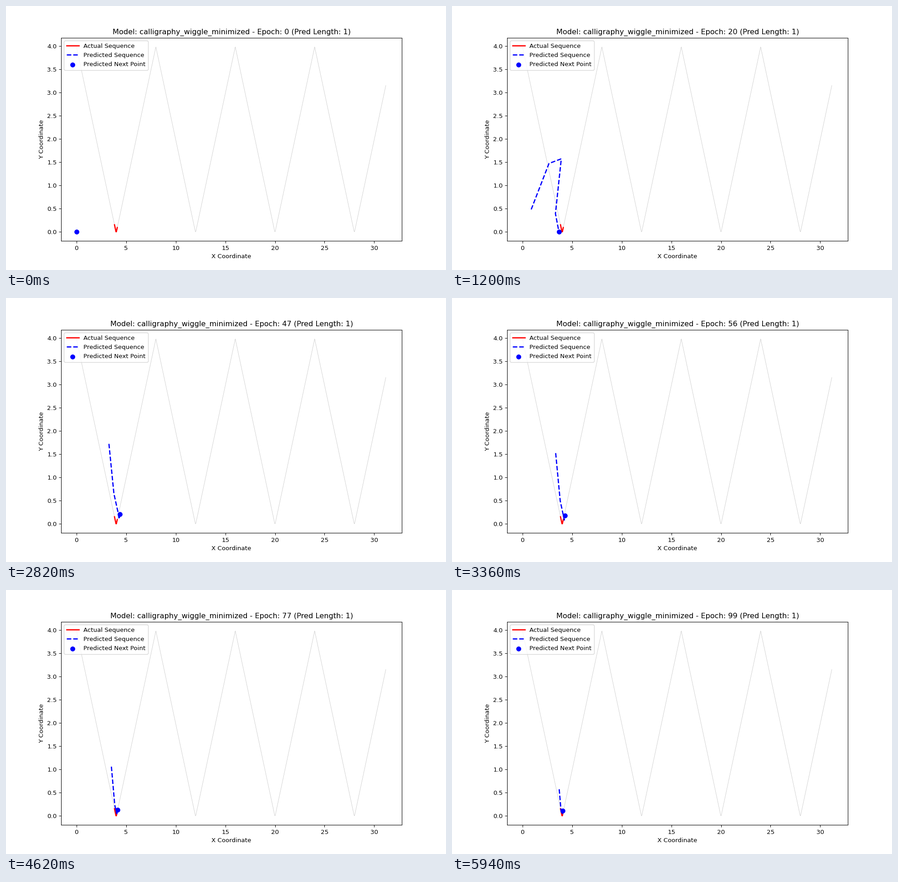
Recreate the animation shown at these times as a matplotlib script. Size 966 by 580 pixels, loop 6000 ms.

```python
import numpy as np
import matplotlib.pyplot as plt
from matplotlib.animation import FuncAnimation

WIDTH, HEIGHT, DPI = 966, 580, 96
EPOCHS, INTERVAL = 100, 60
MODEL = "calligraphy_wiggle_minimized"

# Key shapes of the predicted path, head first
ROUGH = np.array([(0.88, 0.48), (2.67, 1.47), (3.91, 1.57), (3.32, 0.39), (3.67, 0)])
CLOSE = np.array([(3.27, 1.72), (3.77, 0.65), (4.20, 0.23), (4.30, 0.10), (4.38, 0.20)])
FINAL = np.array([(3.70, 0.57), (3.87, 0.15), (3.97, 0.04), (4.02, 0.03), (4.07, 0.11)])
ROUGH_EPOCH, CLOSE_EPOCH, FINAL_EPOCH = 20, 47, 99


def ease_out(start, end, t, power):
    return end + (start - end) * (1 - t) ** power


def predicted_path(epoch):
    """Grow from the origin, swing onto the curve, then settle."""
    if epoch <= ROUGH_EPOCH:
        return ROUGH * epoch / ROUGH_EPOCH
    if epoch <= CLOSE_EPOCH:
        t = (epoch - ROUGH_EPOCH) / (CLOSE_EPOCH - ROUGH_EPOCH)
        return ease_out(ROUGH, CLOSE, t, 2)
    t = (epoch - CLOSE_EPOCH) / (FINAL_EPOCH - CLOSE_EPOCH)
    power = np.where(np.arange(len(FINAL)) == 0, 1, 2)  # the head settles slowest
    return ease_out(CLOSE, FINAL, t, power[:, None])


def zigzag(start, end):
    x = np.arange(start, end, 0.01)
    return x, np.maximum(np.abs(4 - x % 8) - 0.02, 0)


# Text is sized for a 10 inch wide figure
plt.rcParams["font.family"] = "DejaVu Sans"
plt.rcParams["font.size"] = WIDTH / DPI

fig, ax = plt.subplots(figsize=(WIDTH / DPI, HEIGHT / DPI), dpi=DPI)
ax.set_xlim(-1.56, 32.8)
ax.set_ylim(-0.199, 4.179)
ax.set_xlabel("X Coordinate")
ax.set_ylabel("Y Coordinate")

ax.plot(*zigzag(0, 31.18), color="gray", linewidth=0.5, alpha=0.5)
ax.plot(*zigzag(3.83, 4.11), color="red", linewidth=2, label="Actual Sequence")
path_line, = ax.plot([], [], "b--", linewidth=2, label="Predicted Sequence")
next_point = ax.scatter([0], [0], s=50, color="blue", zorder=3,
                        label="Predicted Next Point")
ax.legend(loc="upper left", labelspacing=0.55)
title = ax.set_title("")


def draw(epoch):
    path = predicted_path(epoch)
    path_line.set_data(path[:, 0], path[:, 1])
    next_point.set_offsets(path[-1:])
    title.set_text(f"Model: {MODEL} - Epoch: {epoch} (Pred Length: 1)")
    return path_line, next_point, title


anim = FuncAnimation(fig, draw, frames=EPOCHS, interval=INTERVAL,
                     repeat=True, repeat_delay=0, blit=False)
plt.show()
```
